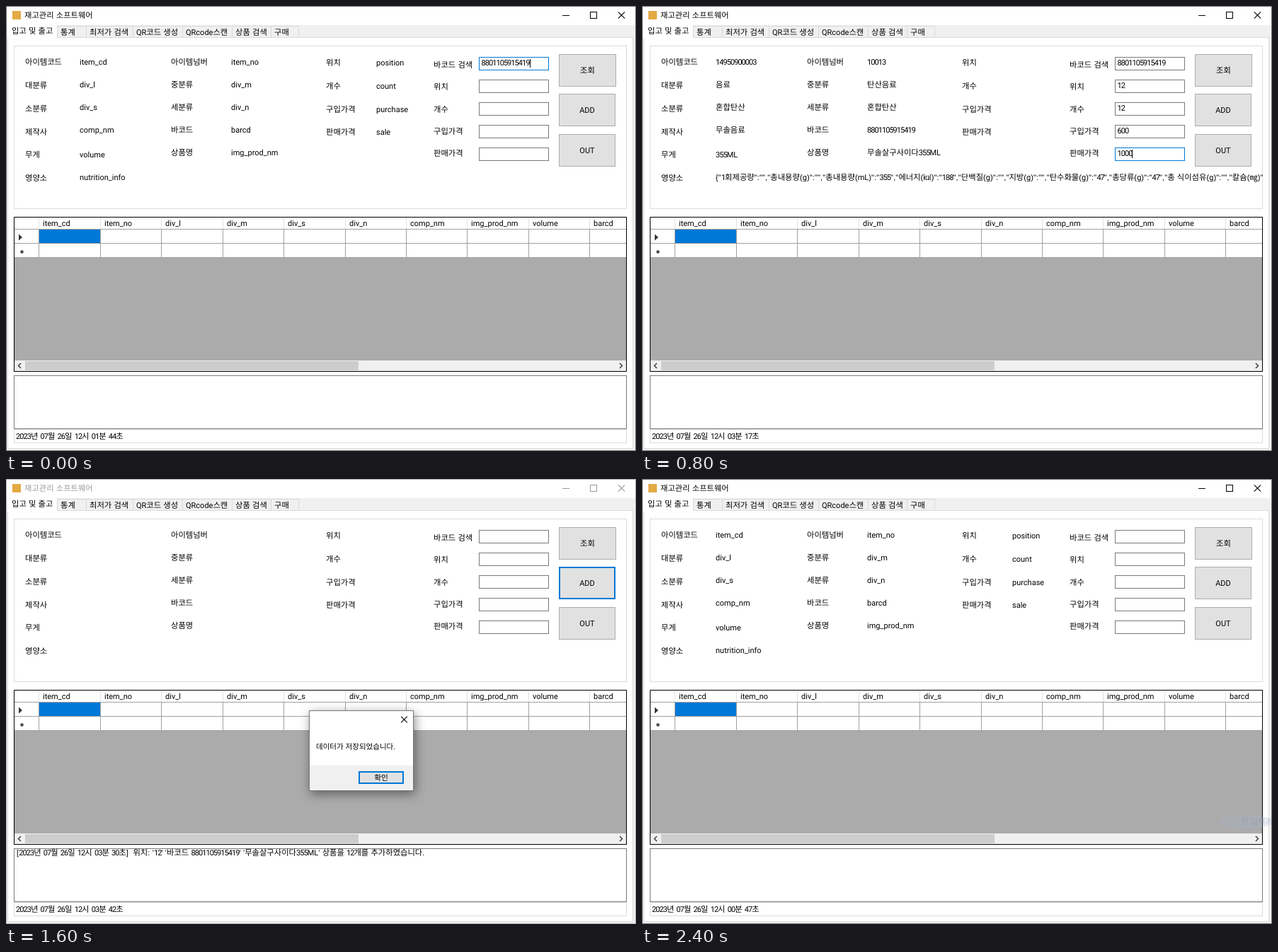
Animation, 890 px wide and 629 px high, one loop 2800 ms. Source, as an HTML page with a canvas:

```html
<!DOCTYPE html>
<html lang="ko">
<head>
<meta charset="utf-8">
<title>재고관리 소프트웨어</title>
<style>
html, body { margin: 0; width: 100%; height: 100%; overflow: hidden; background: #fff; }
canvas { display: block; width: 890px; height: 629px; }
</style>
</head>
<body>
<canvas id="stage" width="890" height="629"></canvas>
<script>
const ctx = document.getElementById('stage').getContext('2d');
const STEP = 400;
const BLUE = '#0078d7', GRID = '#a0a0a0', PALE = '#dcdcdc', FIELD = '#7a7a7a';

const CODE = '8801105915419';
const MAKER = '무솔음료';
const PRODUCT = '무솔살구사이다355ML';
const NUTRITION = '{"1회제공량":"","총내용량(g)":"","총내용량(mL)":"355","에너지(㎉)":"188",' +
  '"단백질(g)":"","지방(g)":"","탄수화물(g)":"47","총당류(g)":"47","총 식이섬유(g)":"","칼슘(㎎)":"",';
const LOG = `[2023년 07월 26일 12시 03분 30초]  위치: '12' '바코드 ${CODE}' '${PRODUCT}' 상품을 12개를 추가하였습니다.`;

const TABS = [
  ['통계', 72, 113], ['최저가 검색', 113, 179], ['QR코드 생성', 179, 249],
  ['QRcode스캔', 249, 319], ['상품 검색', 319, 374], ['구매', 374, 413]
];
const COLUMNS = ['item_cd', 'item_no', 'div_l', 'div_m', 'div_s', 'div_n',
  'comp_nm', 'img_prod_nm', 'volume', 'barcd'];
const ROW = ['14950900003', '10013', '음료', '탄산음료', '혼합탄산', '혼합탄산',
  MAKER, PRODUCT.slice(0, 6) + '...', '355ML', CODE];

// Label blocks: label x, value x, label centres, value centres, labels
const BLOCKS = [
  { x: 27, vx: 104, ys: [79, 112, 145, 178, 210, 243], vys: [79, 111, 143, 175, 210, 242],
    labels: ['아이템코드', '대분류', '소분류', '제작사', '무게', '영양소'],
    names: ['item_cd', 'div_l', 'div_s', 'comp_nm', 'volume', 'nutrition_info'],
    item: ['14950900003', '음료', '혼합탄산', MAKER, '355ML', NUTRITION] },
  { x: 233, vx: 318, ys: [79, 111, 143, 175, 207], vys: [79, 111, 143, 175, 207],
    labels: ['아이템넘버', '중분류', '세분류', '바코드', '상품명'],
    names: ['item_no', 'div_m', 'div_n', 'barcd', 'img_prod_nm'],
    item: ['10013', '탄산음료', '혼합탄산', CODE, PRODUCT] },
  { x: 452, vx: 523, ys: [80, 113, 146, 178], vys: [80, 113, 146, 178],
    labels: ['위치', '개수', '구입가격', '판매가격'],
    names: ['position', 'count', 'purchase', 'sale'], item: [] },
  { x: 604, vx: 0, ys: [83, 114, 146, 177, 208], vys: [],
    labels: ['바코드 검색', '위치', '개수', '구입가격', '판매가격'], names: [], item: [] }
];
const BUTTONS = [['조회', 68, 81], ['ADD', 124, 80], ['OUT', 181, 80]];

const FILLED = [CODE, '12', '12', '600', '1000'];
const SCENES = [
  { clock: ['01', '44'], values: 'names', inputs: [CODE], field: 0 },
  { clock: ['01', '54'], values: 'item', inputs: [CODE], button: 0 },
  { clock: ['03', '17'], values: 'item', inputs: FILLED, field: 4 },
  { clock: ['03', '32'], values: 'item', inputs: FILLED, button: 1, log: true,
    dialog: { x: 433, w: 138, text: '상품이 저장되었습니다.' } },
  { clock: ['03', '42'], inputs: [], button: 1, log: true,
    dialog: { x: 428, w: 148, text: '데이터가 저장되었습니다.' } },
  { clock: ['03', '51'], inputs: [], button: 1, log: true, loaded: true },
  { clock: ['00', '47'], values: 'names', inputs: [], ghost: true }
];

// Each kind of character run has its own face, size and tracking
const RUN = /[0-9]+|[A-Za-z_]+|[^\x00-\x7f]+|[^0-9A-Za-z_\x80-\uffff]+/g;
function face(run) {
  if (/^[0-9]/.test(run)) return [11, 'Roboto, "Liberation Sans", sans-serif', -0.95];
  if (/^[A-Za-z_]/.test(run)) return [11, 'Roboto, "Liberation Sans", sans-serif', 0];
  if (/^[\x00-\x7f]/.test(run)) return [11, '"Liberation Sans", sans-serif', 0.15];
  return [11.3, '"Noto Sans CJK KR", "Noto Sans CJK", sans-serif', 0];
}

function eachRun(str, scale, visit) {
  let x = 0;
  for (const run of str.match(RUN) || []) {
    const [size, family, tracking] = face(run);
    ctx.font = `${size * scale}px ${family}`;
    ctx.letterSpacing = `${tracking * scale}px`;
    visit(run, x);
    x += ctx.measureText(run).width;
  }
  return x;
}

// Draws text from x, vertically centred on cy; returns its width
function text(str, x, cy, color = '#000', scale = 1) {
  ctx.fillStyle = color;
  return eachRun(str, scale, (run, dx) => ctx.fillText(run, x + dx, cy + 4));
}

function centered(str, cx, cy, scale = 1) {
  const width = eachRun(str, scale, () => {});
  text(str, cx - width / 2, cy, '#000', scale);
}

function fill(x, y, w, h, color) {
  ctx.fillStyle = color;
  ctx.fillRect(x, y, w, h);
}

// Border drawn inside the given box
function frame(x, y, w, h, color, weight = 1) {
  ctx.strokeStyle = color;
  ctx.lineWidth = weight;
  ctx.strokeRect(x + weight / 2, y + weight / 2, w - weight, h - weight);
}

function path(points, color, weight = 1) {
  ctx.strokeStyle = color;
  ctx.lineWidth = weight;
  ctx.beginPath();
  points.forEach(([x, y], i) => i ? ctx.lineTo(x, y) : ctx.moveTo(x, y));
  ctx.stroke();
}

function cross(cx, cy, r, color) {
  path([[cx - r, cy - r], [cx + r, cy + r]], color, 1.1);
  path([[cx - r, cy + r], [cx + r, cy - r]], color, 1.1);
}

function clipped(x, y, w, h, draw) {
  ctx.save();
  ctx.beginPath();
  ctx.rect(x, y, w, h);
  ctx.clip();
  draw();
  ctx.restore();
}

function pushButton(label, x, y, w, h, focused, scale = 1) {
  fill(x, y, w, h, '#e1e1e1');
  frame(x, y, w, h, focused ? BLUE : '#adadad', focused ? 2 : 1);
  centered(label, x + w / 2, y + h / 2 - 0.5, scale);
}

function drawWindow(active) {
  const ink = active ? '#000' : '#999';
  fill(0, 0, 890, 629, '#fff');
  fill(9, 7, 12, 12, '#e3aa45');
  text('재고관리 소프트웨어', 26, 13, ink);
  fill(786, 13, 10, 1, ink);
  frame(825, 8, 10, 10, ink);
  cross(869.5, 13, 4.7, ink);

  fill(1, 27, 888, 601, '#f0f0f0');
  fill(2, 45, 884, 581, '#fff');
  frame(2, 44, 884, 582, PALE);
  for (const [label, left, right] of TABS) {
    frame(left, 28, right - left + 1, 17, '#d9d9d9');
    text(label, left + 5, 37);
  }
  fill(2, 26, 70, 20, '#fff');
  fill(72, 27, 1, 18, '#d9d9d9');
  text('입고 및 출고', 8, 35);
  frame(0, 0, 890, 629, active ? '#707070' : '#b0b0b0');
}

function drawForm(scene) {
  frame(11, 56, 866, 231, PALE);
  clipped(12, 57, 865, 229, () => {
    for (const block of BLOCKS) {
      block.labels.forEach((label, i) => text(label, block.x, block.ys[i]));
      (block[scene.values] || []).forEach((value, i) => text(value, block.vx, block.vys[i]));
    }
  });
  for (let i = 0; i < 5; i++) {
    const y = 72 + 32 * i, focused = scene.field === i;
    frame(668, y, 99, 19, focused ? BLUE : FIELD);
    const width = text(scene.inputs[i] || '', 671.5, y + 8);
    if (focused) fill(Math.round(671.5 + width), y + 3, 1, 12, '#000');
  }
  BUTTONS.forEach(([label, y, w], i) => pushButton(label, 781, y, w, 46, scene.button === i));
}

function drawGrid(loaded) {
  const colX = i => Math.round(46.4 + 86.43 * i);
  const bottom = loaded ? 336 : 356;
  fill(12, 299, 864, 202, '#ababab');
  fill(12, 299, 864, bottom - 299, '#fff');
  fill(12, 315, 864, 1, GRID);
  fill(12, 335, 864, 1, GRID);
  if (!loaded) fill(12, 355, 864, 1, GRID);
  fill(47, 316, 86, 19, BLUE);

  clipped(12, 299, 864, 202, () => {
    COLUMNS.forEach((name, i) => {
      const x = colX(i);
      fill(x, 299, 1, 16, '#e2e2e2');
      fill(x, 315, 1, bottom - 315, GRID);
      text(name, x + 6, 307);
      if (loaded) text(ROW[i], x + 3, 325, i ? '#e5a000' : '#fff');
    });
  });

  ctx.fillStyle = '#333';
  ctx.beginPath();
  ctx.moveTo(18, 322.5);
  ctx.lineTo(23, 327);
  ctx.lineTo(18, 331.5);
  ctx.fill();
  if (!loaded) {
    for (let k = 0; k < 3; k++) {
      const a = Math.PI * (k / 3 + 0.5), dx = 2.6 * Math.cos(a), dy = 2.6 * Math.sin(a);
      path([[22.5 - dx, 347.5 - dy], [22.5 + dx, 347.5 + dy]], '#333', 1.3);
    }
  }

  fill(12, 501, 864, 15, '#f0f0f0');
  fill(27, 502, 471, 13, '#cdcdcd');
  path([[21, 505], [17.5, 508.5], [21, 512]], '#404040', 1.5);
  path([[867, 505], [870.5, 508.5], [867, 512]], '#404040', 1.5);
  frame(11, 298, 866, 219, '#000');
}

function drawFooter(scene) {
  const [minute, second] = scene.clock;
  frame(11, 598, 866, 20, PALE);
  frame(11, 522, 866, 76, FIELD);
  if (scene.log) text(LOG, 15, 528);
  text(`2023년 07월 26일 12시 ${minute}분 ${second}초`, 14, 608);
}

function drawDialog({ x, w, text: message }) {
  ctx.save();
  ctx.shadowColor = 'rgba(0,0,0,.45)';
  ctx.shadowBlur = 14;
  ctx.shadowOffsetX = 2;
  ctx.shadowOffsetY = 4;
  fill(x, 327, w, 114, '#fff');
  ctx.restore();
  fill(x, 405, w, 36, '#f0f0f0');
  frame(x, 327, w, 114, '#777');
  cross(x + w - 13.5, 340, 4.3, '#000');
  text(message, x + 10, 378, '#000', 0.93);
  pushButton('확인', x + w - 78, 413, 64, 18, true, 0.95);
}

function drawGhost() {
  ctx.save();
  ctx.globalAlpha = 0.22;
  ctx.fillStyle = '#a3b1cc';
  ctx.beginPath();
  ctx.ellipse(853, 485, 37, 10, 0, 0, 2 * Math.PI);
  ctx.fill();
  ctx.globalAlpha = 0.4;
  clipped(815, 475, 74, 20, () => text('한 입력기', 846, 484, '#8490a8'));
  ctx.restore();
}

function draw(time) {
  const scene = SCENES[Math.floor(time / STEP) % SCENES.length];
  drawWindow(!scene.dialog);
  drawForm(scene);
  drawGrid(scene.loaded);
  drawFooter(scene);
  if (scene.dialog) drawDialog(scene.dialog);
  if (scene.ghost) drawGhost();
}

function tick(now) {
  draw(Math.max(0, now));
  requestAnimationFrame(tick);
}

ctx.textRendering = 'geometricPrecision';
draw(0);
requestAnimationFrame(tick);
</script>
</body>
</html>
```
